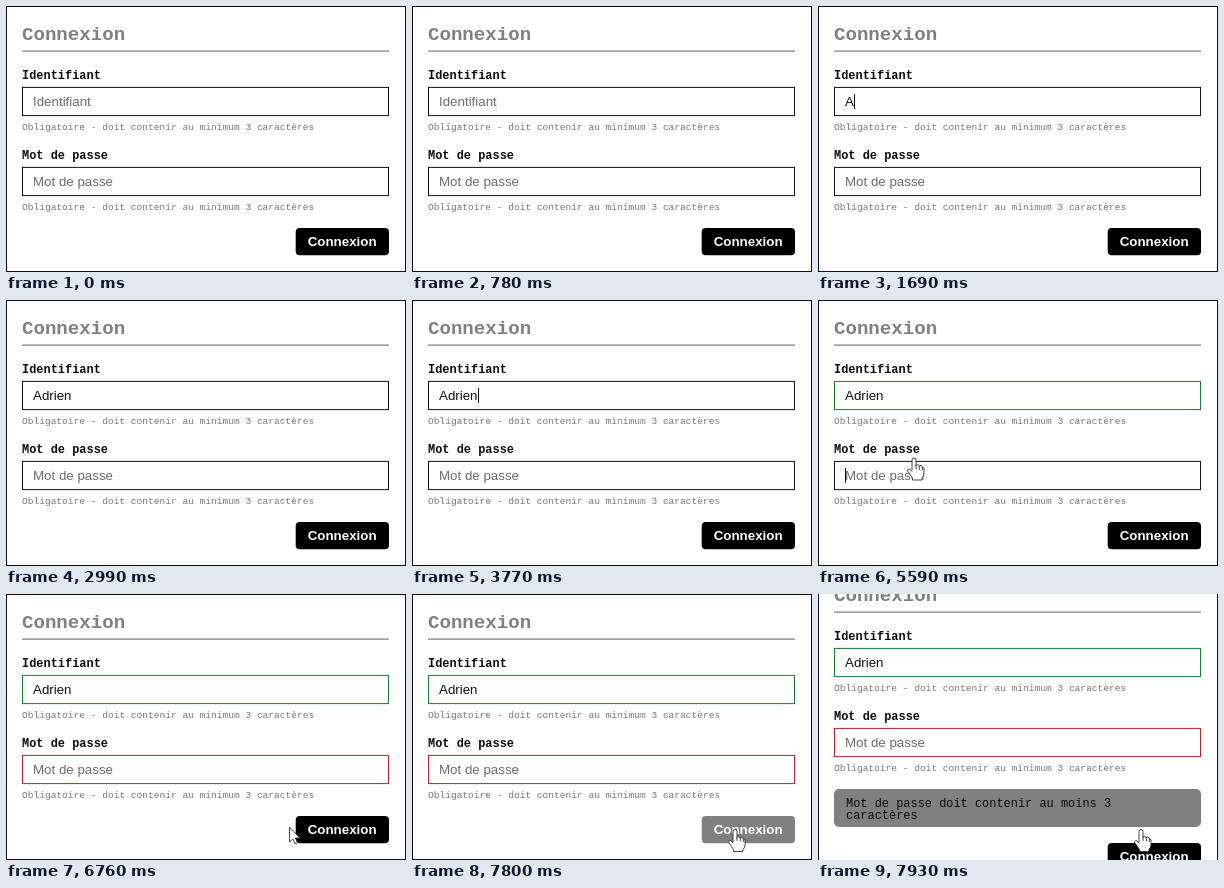
Recreate the animation shown at these times as an HTML page. Size 400 px wide and 266 px high, loop 8 s.

```html
<!DOCTYPE html>
<html lang="fr">
<head>
<meta charset="utf-8">
<title>Connexion</title>
<style>
  html, body { margin: 0; width: 100%; height: 100%; overflow: hidden; background: #fff; }
  /* Slight softness of a scaled-down screen */
  svg { display: block; width: 100%; height: 100%; filter: blur(.4px); }
  text { font: 13.333px "Liberation Sans", Arial, sans-serif; white-space: pre; }
  .title, .label, .help, .message { font-family: "Liberation Mono", "DejaVu Sans Mono", monospace; }
  .title { font-size: 19.1px; font-weight: 700; fill: #808080; }
  .label { font-size: 11.95px; font-weight: 700; fill: #0c0c0c; }
  .help { font-size: 9.55px; fill: #787878; }
  .message { font-size: 11.95px; fill: #0c0c0c; }
  .hint { fill: #6c6c6c; }
  .value { fill: #111; }
  .button { font-weight: 700; fill: #fff; }
  .box { fill: none; stroke: #111; }
  .pointer { fill: #fff; stroke: #333; stroke-width: .9; stroke-linejoin: round; stroke-linecap: round; }
</style>
</head>
<body>
<svg viewBox="0 0 400 266">
  <rect id="card" class="box" x=".5" y=".5" width="399" height="265" stroke="#333"/>
  <g id="form">
    <text class="title" x="16" y="33.5">Connexion</text>
    <path d="M16 45.2H383" stroke="#808080" stroke-width="1.2"/>

    <text class="label" x="16" y="73">Identifiant</text>
    <rect id="userBox" class="box" x="16.5" y="81.4" width="366" height="28.2"/>
    <text id="user" x="27" y="100"></text>
    <text class="help" x="16" y="124">Obligatoire - doit contenir au minimum 3 caractères</text>

    <text class="label" x="16" y="153">Mot de passe</text>
    <rect id="passBox" class="box" x="16.5" y="161.4" width="366" height="28.2"/>
    <text class="hint" x="27" y="180">Mot de passe</text>
    <text class="help" x="16" y="204">Obligatoire - doit contenir au minimum 3 caractères</text>

    <path id="caret" d="M.5 0V15" stroke="#111"/>

    <g id="error">
      <rect x="16" y="222" width="367" height="38" rx="5" fill="#808080"/>
      <text class="message" x="28" y="240">Mot de passe doit contenir au moins 3</text>
      <text class="message" x="28" y="252">caractères</text>
    </g>
    <g id="submit">
      <rect id="submitBox" x="289.7" y="222" width="93.3" height="27.3" rx="4"/>
      <text class="button" x="301.7" y="240.3">Connexion</text>
    </g>
  </g>
  <g id="mouse" class="pointer">
    <path id="arrow" d="M0 0V14.5L3.4 11.5L5.6 16.3L8 15.2L5.8 10.5H10.2Z"/>
    <path id="hand" d="M-2 12V2Q-2 0 0 0T2 2V8Q2 6.5 3.5 6.7T5.3 8.5Q5.5 7.2 7 7.6T8.3 9.5Q9.8 8.6 10 10.8V15Q10 18 8 20V22H-1.5V20L-6 13.5Q-7 11.5-5.5 11T-2 13.5M2 8V11M5.3 8.5V11.5M8.3 9.5V12"/>
    <path id="beam" fill="none" d="M-3-8H-1L0-7L1-8H3M0-7V7M-3 8H-1L0 7L1 8H3"/>
  </g>
</svg>
<script>
const LOOP = 8000, STEP = 130, BLINK = 520;
const NAME = 'Adrien';
const TYPE_FIRST = 1690, TYPE_REST = 1950, TYPED = 2470;
const USER_BLUR = 4420, PASS_FOCUS = 4550, PASS_BLUR = 6760, SUBMIT = 7930;
const MESSAGE_HEIGHT = 54;

// Pointer stops: time, x, y
const route = [
  [4030, 122, 100], [4160, 112, 124], [4420, 93, 159.5], [4940, 93, 159.5],
  [5070, 96, 158], [5590, 96, 158], [5850, 205, 210], [6110, 205, 210],
  [6240, 282, 229], [6630, 282, 229], [6760, 283.5, 233.5], [7280, 323, 235.5],
  [LOOP, 323, 235.5]
];

const $ = id => document.getElementById(id);
const show = (id, on) => $(id).setAttribute('visibility', on ? 'inherit' : 'hidden');
const move = (id, x, y) => $(id).setAttribute('transform', `translate(${x} ${y})`);
const inside = (x, y, x0, y0, x1, y1) => x >= x0 && x <= x1 && y >= y0 && y <= y1;
const blinkOn = (t, start) => Math.floor((t - start) / BLINK) % 2 === 0;

function typedLetters(t) {
  if (t < TYPE_FIRST) return 0;
  if (t < TYPE_REST) return 1;
  return Math.min(NAME.length, 2 + Math.floor((t - TYPE_REST) / STEP));
}

function pointerAt(t) {
  const i = Math.max(1, route.findIndex(stop => stop[0] > t));
  const [t0, x0, y0] = route[i - 1], [t1, x1, y1] = route[i];
  const k = Math.max(0, (t - t0) / (t1 - t0));
  return [x0 + (x1 - x0) * k, y0 + (y1 - y0) * k];
}

function drawCaret(t, letters) {
  const inUser = t < USER_BLUR;
  const inPass = t >= PASS_FOCUS && t < PASS_BLUR;
  const start = inPass ? PASS_FOCUS : t < TYPE_FIRST ? 260 : t < TYPED ? t : TYPED;
  const width = inUser && letters ? $('user').getComputedTextLength() + 1 : 0;
  show('caret', (inUser || inPass) && t >= 260 && blinkOn(t, start));
  move('caret', Math.floor(27 + width), inUser ? 88 : 168);
}

function drawPointer(t) {
  const [x, y] = pointerAt(t);
  const onButton = inside(x, y, 290, 222, 383, 249);
  const onField = inside(x, y, 16, 81, 383, 110) || inside(x, y, 16, 161, 383, 190);
  const onLabel = inside(x, y, 16, 140, 103, 161);
  const shape = onButton || onLabel ? 'hand' : onField ? 'beam' : 'arrow';
  show('mouse', t >= route[0][0]);
  for (const id of ['arrow', 'hand', 'beam']) show(id, id === shape);
  move('mouse', x, y);
  $('submitBox').setAttribute('fill', onButton && t < SUBMIT ? '#808080' : '#000');
}

function draw(t) {
  const letters = typedLetters(t);
  const user = $('user');
  user.textContent = letters ? NAME.slice(0, letters) : 'Identifiant';
  user.setAttribute('class', letters ? 'value' : 'hint');
  $('userBox').style.stroke = t >= USER_BLUR ? '#178030' : '';
  $('passBox').style.stroke = t >= PASS_BLUR ? '#b8222a' : '';
  drawCaret(t, letters);
  drawPointer(t);

  // The card stays centred, so it grows by half the message on each side
  const extra = t >= SUBMIT ? MESSAGE_HEIGHT : 0;
  show('error', extra > 0);
  move('submit', 0, extra);
  move('form', 0, -extra / 2);
  $('card').setAttribute('y', 0.5 - extra / 2);
  $('card').setAttribute('height', 265 + extra);
}

const origin = performance.now();
function tick() {
  const time = (performance.now() - origin) % LOOP;
  draw(Math.floor(time / STEP) * STEP);
  requestAnimationFrame(tick);
}
tick();
</script>
</body>
</html>
```
